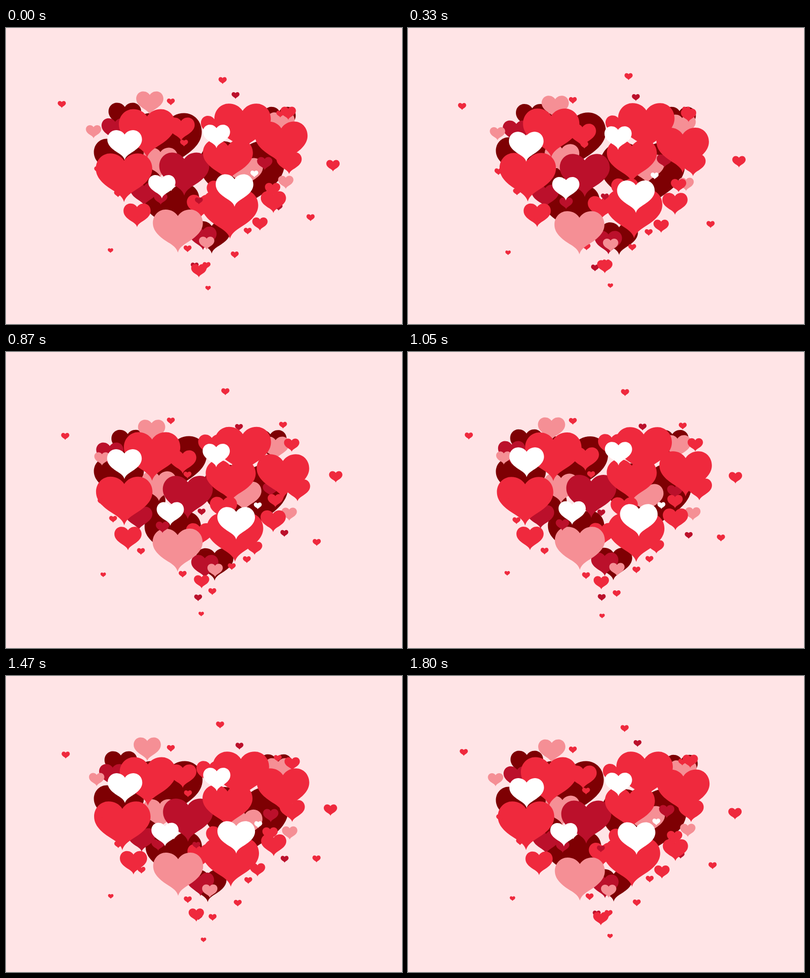
Write an HTML page with a canvas that moves like this. It is 800x600 px and loops after 1.83 s.

```html
<!DOCTYPE html>
<html lang="en">
<head>
<meta charset="utf-8">
<title>Heart of hearts</title>
<style>
html, body { margin: 0; width: 100%; height: 100%; overflow: hidden; background: #ffe4e6; }
canvas { display: block; }
</style>
</head>
<body>
<canvas id="stage" width="800" height="600"></canvas>
<script>
const ctx = document.getElementById('stage').getContext('2d');
const STEP = 30, STEPS = 60, LOOP = 1830;
const MAROON = '#7e0003', CRIMSON = '#bb102b', RED = '#ef293d', PINK = '#f58f95', WHITE = '#fff';

// Unit heart: one wide, notch and tip on x = 0, lobes touching y = 0
const HEART = new Path2D(`M0 .13 C.05 .05 .14 0 .245 0 C.39 0 .5 .12 .5 .27
  C.5 .46 .32 .58 .16 .68 C.07 .74 .02 .79 0 .865
  C-.02 .79 -.07 .74 -.16 .68 C-.32 .58 -.5 .46 -.5 .27 C-.5 .12 -.39 0 -.245 0 C-.14 0 -.05 .05 0 .13Z`);

// Every heart floats once round an ellipse; hearts that drift together share one
const orbit = (xCos, xSin, yCos, ySin) => (cos, sin) => [xCos * cos + xSin * sin, yCos * cos + ySin * sin];
const drift = orbit(-3.8, -6.2, -8.1, -.7);
const rise = orbit(-2.4, 7.2, 13.1, -.4);
const sway = orbit(0, 3.8, .7, -.6);
const slide = orbit(-5, 1.5, 1, -.6);
const bob = orbit(.2, -.8, 5.4, 7.3);
const push = orbit(-8.6, -1.3, -3.1, 2.4);
const dip = orbit(-1.8, -2.6, -8.4, 8.1);
const swing = orbit(-1.5, 6.6, -4, 7);
const lean = orbit(-2.4, 10.4, -3.1, .9);
const back = orbit(5.5, 1.8, 0, 4.8);
const sag = orbit(.8, -1.8, -4.6, 0);
const hook = orbit(4.8, -3.6, -1.7, -5.3);
const climb = orbit(-6.3, -9.2, -2.6, -7.3);
const veer = orbit(9.3, 1.9, .8, .6);
const glide = orbit(-3.9, -5.8, .9, 3.6);
const lift = orbit(3.1, 7.8, 5.6, 2.7);
const arch = orbit(-3, 3.5, 8, .3);
const nudge = orbit(-2.7, 2.6, 3.7, 3);
const flip = orbit(2.6, -8.3, 12, -8.6);
const sweep = orbit(-6.7, -8.8, 0, 15);
const hop = orbit(0, 0, 5, 0);
const fall = orbit(7.2, 5.4, -2.3, -6.9);
const spin = orbit(7.1, -5.2, 0, 5);
const stir = orbit(-2, -4.8, -3.7, 2);
const sink = orbit(1.5, 0, 0, -8);

const hearts = [];
let color;
const heart = (move, width, x, y) => hearts.push({ color, move, width, x, y });

// Back to front; x is the middle of a heart, y its top
color = MAROON;
heart(hop, 101, 228, 219.5);
heart(lean, 66, 242.5, 154.5);
heart(slide, 140, 330.5, 171.5);
heart(glide, 172, 480.5, 228);
heart(slide, 66, 284, 284);
heart(stir, 114, 335.5, 319.5);
heart(lean, 76, 418, 394.5);
heart(veer, 66, 543, 159);

color = PINK;
heart(swing, 55, 292, 132.5);
heart(sink, 70, 310.5, 242.5);
heart(sink, 70, 482.5, 263.5);
heart(back, 55, 550, 171);
heart(drift, 31, 569, 307.5);

color = CRIMSON;
heart(glide, 101, 364, 251.5);
heart(back, 55, 215, 183);
heart(back, 55, 273.5, 313);
heart(climb, 31, 529, 264);
heart(swing, 55, 399.5, 406.5);
heart(drift, 16, 467.5, 138);
heart(drift, 16, 385, 483.5);
heart(climb, 16, 557, 359);

color = PINK;
heart(push, 31, 185.5, 200);

color = RED;
heart(sway, 114, 238.5, 253.5);
heart(slide, 114, 290, 163.5);
heart(dip, 55, 355.5, 190);
heart(drift, 16, 363.5, 234.5);
heart(hop, 16, 333, 138);
heart(drift, 16.5, 116.5, 156);
heart(rise, 16.5, 440, 86.5);
heart(sway, 114, 478, 152.5);
heart(lift, 55, 418, 172.5);
heart(nudge, 101, 451, 222);
heart(dip, 106, 558, 198);
heart(push, 51, 580.5, 255);
heart(bob, 51, 540, 325.5);
heart(rise, 31, 541, 301);
heart(slide, 114, 457.5, 327.5);
heart(arch, 55, 436, 301.5);
heart(sag, 55, 392, 342.5);
heart(veer, 55, 255.5, 355);
heart(drift, 16, 269.5, 389.5);
heart(hook, 16, 221.5, 331);
heart(drift, 16, 190, 288.5);
heart(back, 31, 507.5, 384);
heart(sag, 16, 487.5, 409.5);
heart(flip, 16, 459.5, 441);
heart(hook, 16, 362, 442.5);
heart(climb, 16, 411.5, 477);
heart(rise, 31, 392, 465.5);
heart(fall, 11, 401, 525);
heart(spin, 11, 204, 446.5);
heart(rise, 27, 663, 254.5);
heart(sweep, 16.5, 622, 377.5);
heart(drift, 31, 574, 167.5);
heart(rise, 16, 556.5, 154.5);

color = PINK;
heart(bob, 101, 347, 362.5);
heart(push, 31, 414, 426);

color = CRIMSON;
heart(swing, 27, 314, 339);
heart(rise, 16, 392, 330.5);

color = WHITE;
heart(bob, 70, 239.5, 201.5);
heart(push, 55, 323.5, 301);
heart(bob, 55, 425, 190.5);
heart(dip, 76, 463.5, 305);
heart(drift, 16, 505.5, 297);

function draw(time) {
  const angle = Math.floor((time % LOOP) / STEP) / STEPS * 2 * Math.PI;
  const cos = Math.cos(angle), sin = Math.sin(angle);
  ctx.fillStyle = '#ffe4e6';
  ctx.fillRect(0, 0, 800, 600);
  for (const { color, move, width, x, y } of hearts) {
    const [dx, dy] = move(cos, sin);
    ctx.setTransform(width, 0, 0, width, x + dx, y + dy);
    ctx.fillStyle = color;
    ctx.fill(HEART);
  }
  ctx.resetTransform();
}

const start = performance.now();
function tick() {
  draw(performance.now() - start);
  requestAnimationFrame(tick);
}
tick();
</script>
</body>
</html>
```
